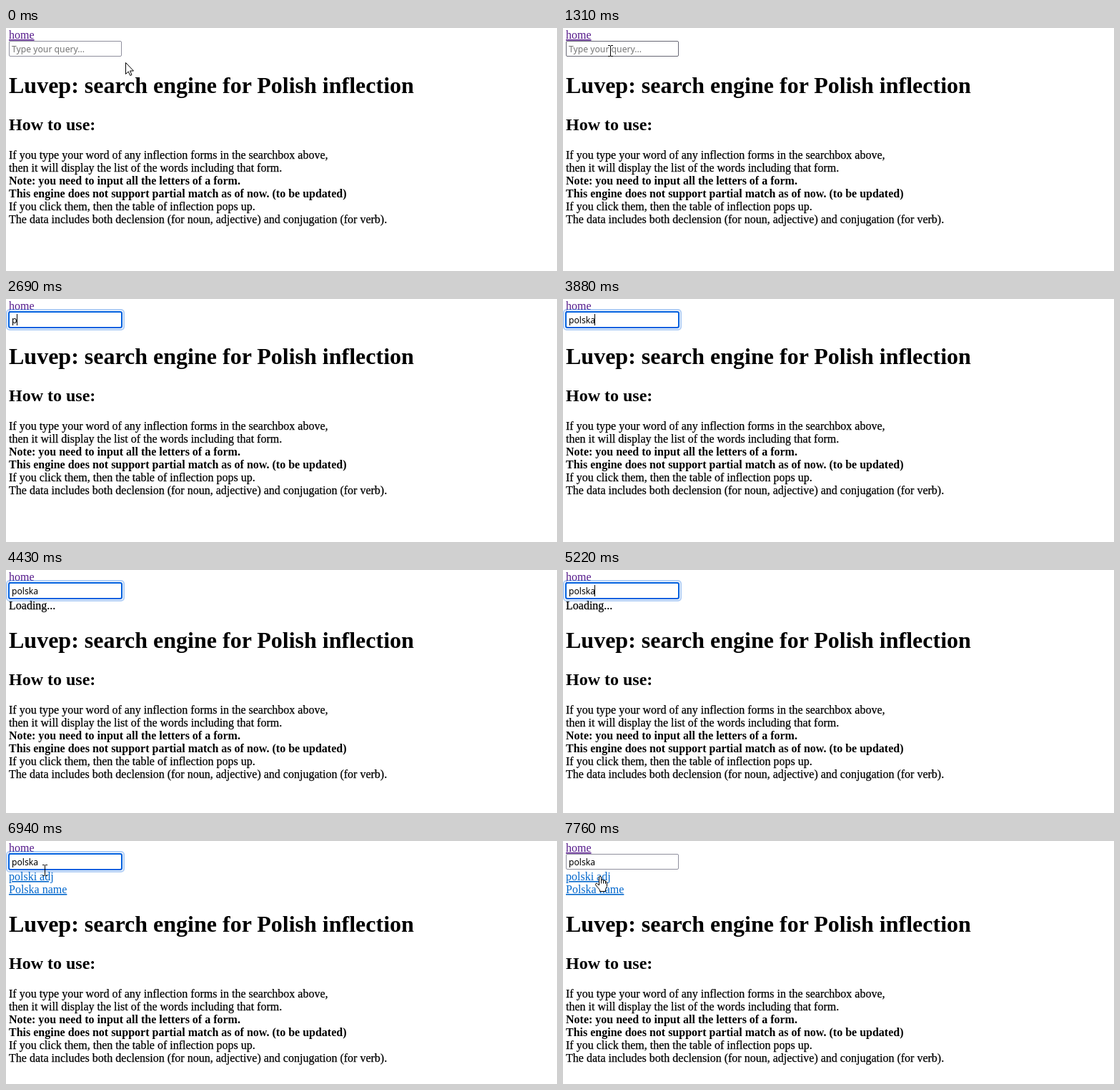
Animation of 771x340 px, one loop 8 s. Source, as an HTML page:

```html
<!DOCTYPE html>
<html lang="en">
<head>
<meta charset="utf-8">
<title>Polish inflection search</title>
<style>
  html, body { margin: 0; width: 100%; height: 100%; overflow: hidden; background: #fff; }
  svg { display: block; width: 771px; height: 340px; }
  text { font: 16px "Liberation Serif", serif; font-variant-ligatures: none; }
  .body { stroke: #000; stroke-width: .25; }
  .title { font-size: 32px; font-weight: bold; }
  .subtitle { font-size: 24px; font-weight: bold; }
  .bold { font-weight: bold; }
  .link { fill: #0066cc; text-decoration: underline 1px; text-underline-offset: 1px; }
  .visited { fill: #551a8b; }
  .field { font: 12.2px "Noto Sans", sans-serif; }
  .crisp { shape-rendering: crispEdges; }
  .outlined { fill: #fff; stroke: #000; stroke-width: 1; stroke-linejoin: round; }
  #ring rect { fill: none; }
</style>
</head>
<body>
<svg viewBox="0 0 771 340">
  <text class="link visited" x="4" y="15">home</text>

  <text id="loading" class="body" x="4" y="55">Loading...</text>
  <g id="results">
    <text id="firstResult" class="link" x="4" y="55">polski adj</text>
    <text class="link" x="4" y="73">Polska name</text>
  </g>

  <g id="page">
    <text class="title" x="4" y="91">Luvep: search engine for Polish inflection</text>
    <text class="subtitle" x="4" y="143">How to use:</text>
    <text class="body" x="4" y="183">If you type your word of any inflection forms in the searchbox above,</text>
    <text class="body" x="4" y="201">then it will display the list of the words including that form.</text>
    <text class="bold" x="4" y="219">Note: you need to input all the letters of a form.</text>
    <text class="bold" x="4" y="237">This engine does not support partial match as of now. (to be updated)</text>
    <text class="body" x="4" y="255">If you click them, then the table of inflection pops up.</text>
    <text class="body" x="4" y="273">The data includes both declension (for noun, adjective) and conjugation (for verb).</text>
  </g>

  <rect id="border" x="4.5" y="18.5" width="157" height="21" rx="1.5" fill="#fff"/>
  <g id="ring">
    <rect x="1" y="15" width="164" height="28" rx="4" stroke="#0060df" stroke-opacity=".3" stroke-width="2"/>
    <rect x="2.5" y="16.5" width="161" height="25" rx="3" stroke="#fff"/>
    <rect x="4" y="18" width="158" height="22" rx="2" stroke="#0060df" stroke-width="2"/>
  </g>
  <text id="placeholder" class="field" x="8" y="34" fill="#757575">Type your query...</text>
  <text id="query" class="field" x="8" y="34"></text>
  <rect id="caret" class="crisp" y="21" width="1" height="16"/>

  <path id="arrow" class="outlined" d="M.5 .5V16.5L4.2 13L6.8 18.5L9 17.5L6.6 12H11.5Z"/>
  <path id="beam" class="crisp" d="M0 0h3v1h-3zM4 0h3v1h-3zM3 1h1v14h-1zM0 15h3v1h-3zM4 15h3v1h-3z"/>
  <g id="hand">
    <path class="outlined" d="M5.5 13V2Q5.5 .5 7 .5T8.5 2V6Q8.5 5 10 5T11.5 6.5Q11.5 6 13 6T14.5 8Q16.5 7.5 16.5 9.5V14.5L14.5 18.5V21.5H6.5V19.5L1 13Q0 11.5 1 10.5T3.5 11Z"/>
    <path d="M8.5 6V10.5M11.5 7V10.5M14.5 8V11" fill="none" stroke="#000"/>
  </g>
</svg>
<script>
const LOOP = 8000;
const WORD = "polska";
const KEY_TIMES = [2690, 2820, 3160, 3360, 3820, 3880];
const CARET_X = [8, 15, 22, 25, 31, 38, 44];
const CARET_ON = [[1710, 2230], [2690, 4430], [5220, 5750], [6280, 6810], [7360, 7560]];

const el = id => document.getElementById(id);
const within = (t, from, to) => t >= from && t < to;
const show = (id, visible) => el(id).setAttribute("display", visible ? "inline" : "none");
const place = (id, x, y) => el(id).setAttribute("transform", `translate(${Math.round(x)} ${Math.round(y)})`);
const mix = (a, b, k) => a + (b - a) * k;

// Fraction travelled when a move happens in a few discrete jumps.
function stepped(t, start, end, count) {
  if (t < start) return 0;
  const gap = (end - start) / (count - 1);
  return Math.min(count, Math.floor((t - start) / gap) + 1) / count;
}

function pointerAt(t) {
  if (t < 2690) {
    const k = stepped(t, 1020, 1310, 5);
    const eased = 1 - (1 - k) ** 1.5;
    const x = mix(167, 66, eased), y = mix(48, 32, eased);
    return { x, y, shape: y < 40 && x < 162 ? "beam" : "arrow" };
  }
  if (t < 6540) return { x: 0, y: 0, shape: "" };
  const k = stepped(t, 6740, 7080, 6);
  const y = mix(32, 49, k);
  return { x: mix(57, 51, k), y, shape: y < 41 ? "beam" : "hand" };
}

function render(t) {
  const { x, y, shape } = pointerAt(t);
  for (const id of ["arrow", "beam", "hand"]) show(id, id === shape);
  place("arrow", x, y);
  place("beam", x - 3, y - 8);
  place("hand", x - 6, y);

  const typed = KEY_TIMES.filter(time => t >= time).length;
  el("query").textContent = WORD.slice(0, typed);
  show("placeholder", typed === 0);
  el("caret").setAttribute("x", CARET_X[typed]);
  show("caret", CARET_ON.some(([from, to]) => within(t, from, to)));

  show("ring", within(t, 1650, 7560));
  el("border").setAttribute("stroke", shape === "beam" ? "#676774" : "#8f8f9d");

  show("loading", within(t, 4430, 5680));
  show("results", t >= 5680);
  el("firstResult").style.fill = within(t, 7560, 7760) ? "#ee0000" : "";
  place("page", 0, t < 4430 ? 0 : t < 5680 ? 18 : 36);
}

const began = performance.now();
function tick() {
  render((performance.now() - began) % LOOP);
  requestAnimationFrame(tick);
}
tick();
</script>
</body>
</html>
```
